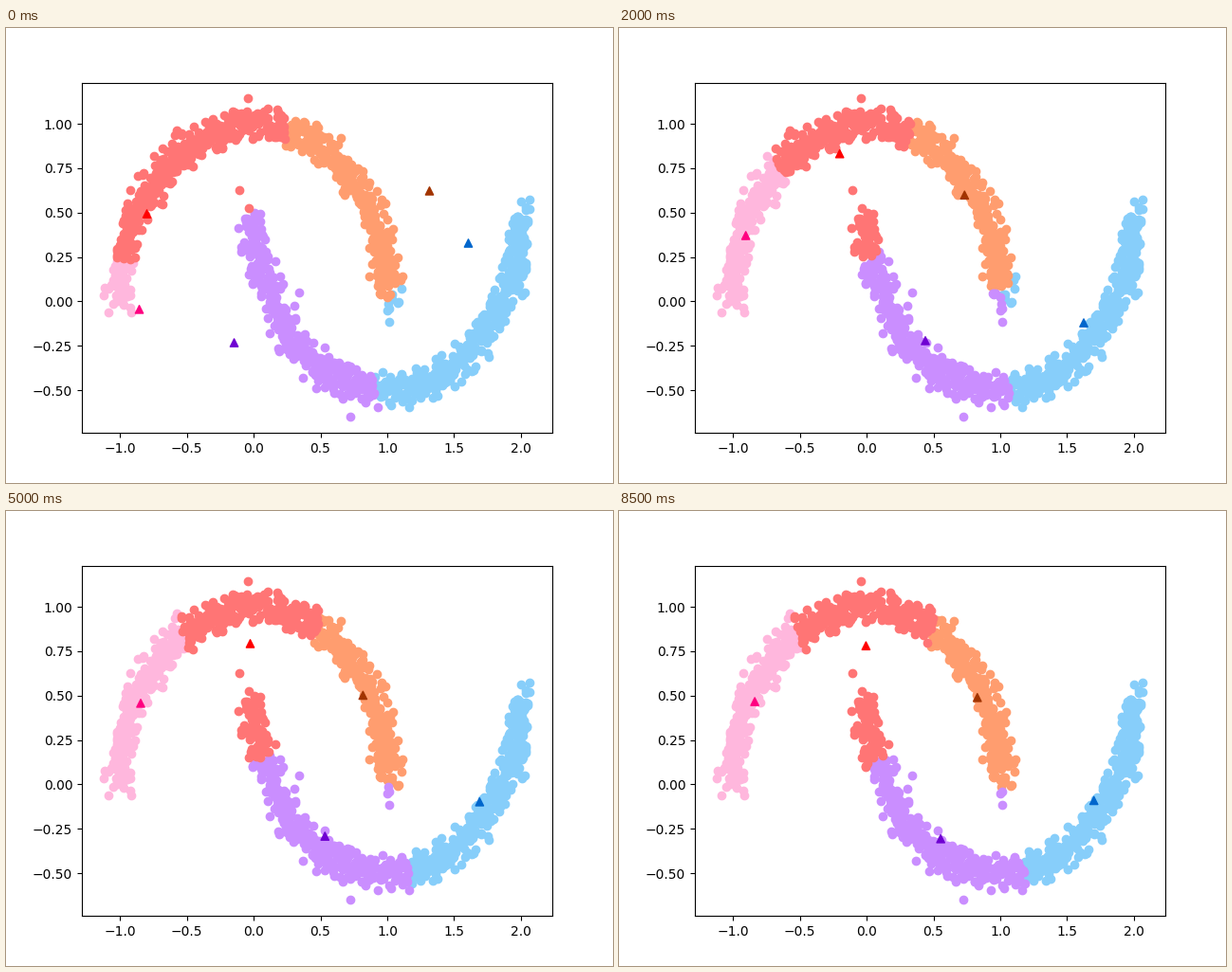
Recreate the animation shown at these times as a matplotlib script. Size 640 by 480 pixels, loop 9000 ms.

```python
import numpy as np
import matplotlib.pyplot as plt
from matplotlib.animation import FuncAnimation

STEPS, STEP_MS = 18, 500
PER_ARC, NOISE = 750, 0.05

# Light colour, dark colour and starting centre, in drawing order
CLUSTERS = [
    ("#87CEFA", "#0066CC", (1.607, 0.328)),
    ("#FF9D6F", "#A23400", (1.316, 0.622)),
    ("#FFB7DD", "#FF0080", (-0.856, -0.045)),
    ("#CA8EFF", "#6F00D2", (-0.146, -0.233)),
    ("#FF7575", "#FF0000", (-0.799, 0.493)),
]
light, dark, start = zip(*CLUSTERS)

# The most distant samples, which also bound the cloud
STRAYS = [(-0.04, 1.142), (0.725, -0.65), (0.34, 0.05), (-0.11, 0.625),
          (-1.122, 0.035), (2.068, 0.575), (1.015, -0.115)]
LOW, HIGH = (-1.122, -0.6), (2.072, 1.1)


def arc(rng, centre, sign):
    """Noisy half circle, cut at its rim, its ends and the cloud's bounds."""
    t = np.linspace(0, np.pi, PER_ARC)
    ring = np.column_stack([np.cos(t), sign * np.sin(t)])
    ring += rng.normal(scale=NOISE, size=ring.shape)
    off = np.abs(np.hypot(ring[:, 0], ring[:, 1]) - 1)
    keep = (off < 0.13) & (sign * ring[:, 1] > -0.065)
    pts = ring[keep] + centre
    return pts[((pts > LOW) & (pts < HIGH)).all(axis=1)]


def nearest(centres):
    gap = points[:, None, :] - centres[None, :, :]
    return (gap ** 2).sum(axis=2).argmin(axis=1)


def means(label):
    return np.array([points[label == k].mean(axis=0)
                     for k in range(len(CLUSTERS))])


rng = np.random.RandomState(4)
points = np.vstack([arc(rng, (0, 0), 1), arc(rng, (1, 0.5), -1), STRAYS])

# Each step moves every centre to the mean of its own samples
path = [np.array(start)]
for _ in range(STEPS - 1):
    path.append(means(nearest(path[-1])))

fig, ax = plt.subplots(figsize=(6.4, 4.8), dpi=100)
ax.set_xlim(-1.2857, 2.2353)
ax.set_ylim(-0.741, 1.2322)
layers = [ax.scatter([], [], color=c) for c in light]
marks = ax.scatter(path[0][:, 0], path[0][:, 1], marker="^", c=dark, zorder=3)


def draw(step):
    label = nearest(path[step])
    for k, layer in enumerate(layers):
        layer.set_offsets(points[label == k])
    marks.set_offsets(path[step])
    return layers + [marks]


anim = FuncAnimation(fig, draw, frames=STEPS, interval=STEP_MS,
                     repeat=True, repeat_delay=0)
plt.show()
```
